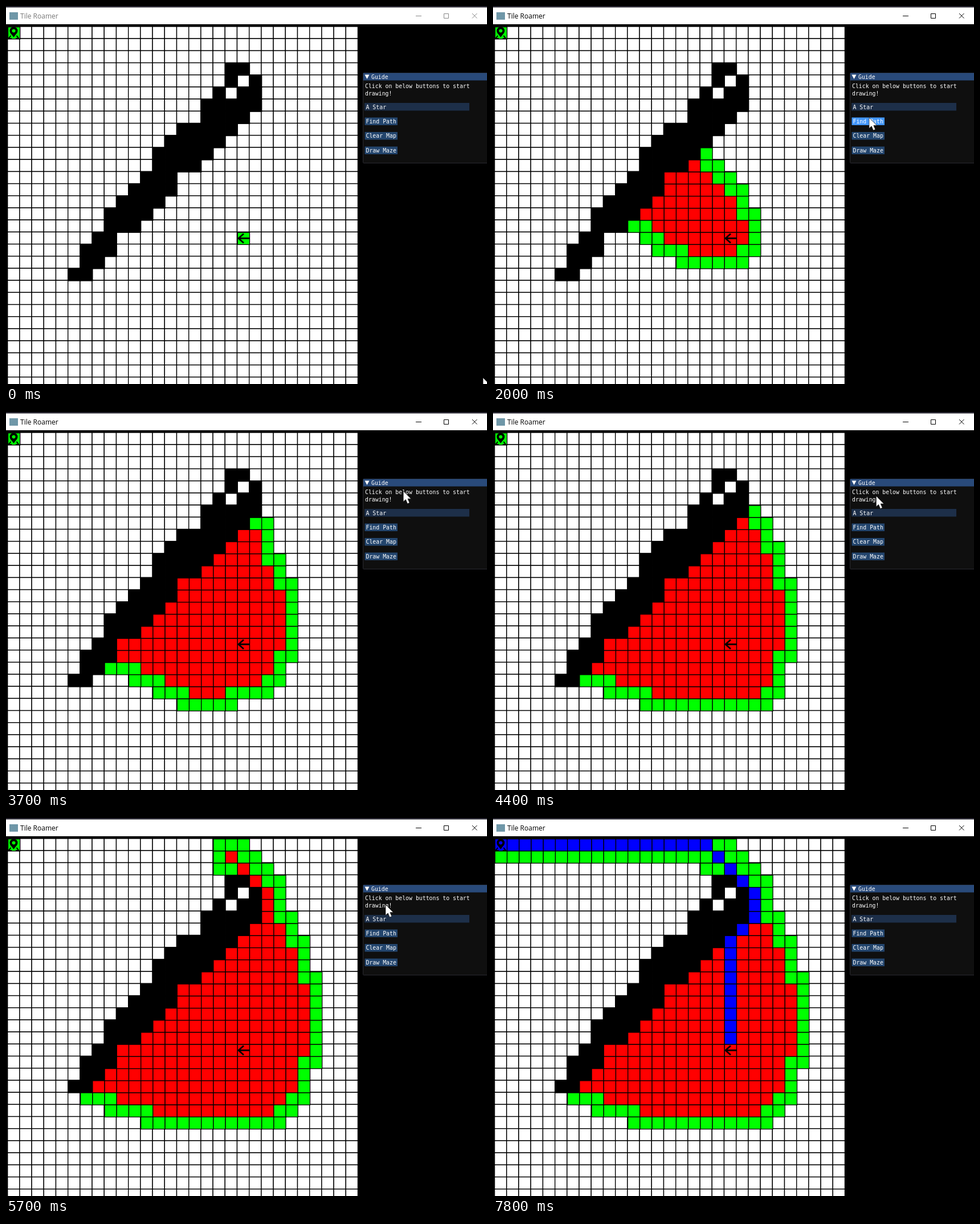
Recreate the animation shown at these times as an HTML page. Size 844 by 663 pixels, loop 7.9 s.

```html
<!DOCTYPE html>
<html lang="en">
<head>
<meta charset="utf-8">
<title>Tile Roamer</title>
<style>
  html, body { margin: 0; width: 100%; height: 100%; overflow: hidden; background: #000; }
  svg { display: block; }
  .mono { font: 9.86px "DejaVu Sans Mono", monospace; fill: #fff; }
  .caption { font: 12px "Open Sans", "Noto Sans", sans-serif; }
</style>
</head>
<body>
<svg id="stage" width="844" height="663" viewBox="0 0 844 663">
  <rect width="844" height="663"/>
  <g id="board" fill="#fff" stroke="#000" stroke-width="1.4"></g>
  <g id="cells" stroke="#000" stroke-width="1.3"></g>

  <g id="icons">
    <path fill-rule="evenodd" d="M13.5 55 C11 50.5 6.5 48 6.5 43.5 A7 7 0 0 1 20.500 43.5 C20.500 48 16 50.500 13.5 55Z
      M13.5 40.400 a3.100 3.100 0 1 0 .01 0Z"/>
    <path d="M8.500 52 L4.500 57 H10 M18.500 52 L22.500 57 H17" fill="none" stroke="#000" stroke-width="2"/>
    <path d="M427 407.500 H408 M417 399.500 L408 407.500 L417 415.500" fill="none" stroke="#000" stroke-width="2.800"/>
  </g>

  <rect width="844" height="3" fill="#24222c"/>
  <rect y="2.500" width="844" height="29.500" fill="#fff"/>
  <rect x="6" y="11" width="15" height="13" fill="#6f97a8"/>
  <g id="titlebar">
    <text class="caption" x="25" y="22">Tile Roamer</text>
    <path id="windowButtons" d="M719 17.500 H729 M768.500 13.500 h8 v8 h-8Z M818 13 l8.500 8.500 M826.500 13 l-8.500 8.500" fill="none"/>
  </g>

  <rect x="626.500" y="117.500" width="220" height="158" rx="1" fill="#0f0f0f" stroke="#2b2b32"/>
  <rect x="627" y="117.500" width="217" height="13" fill="#294a7a"/>
  <path d="M629.500 120.500 h8 l-4 7.500Z" fill="#fff"/>
  <rect x="629" y="170" width="184" height="13.500" fill="#1d2f49"/>
  <g id="buttons"></g>
  <g class="mono">
    <text x="641" y="128">Guide</text>
    <text x="630" y="143.500">Click on below buttons to start</text>
    <text x="630" y="156.500">drawing!</text>
    <text x="631.500" y="180.500">A Star</text>
  </g>
  <path id="cursor" d="M0 0 V18.500 L4.200 14.800 L7.300 22 L10.800 20.500 L7.800 13.500 H13.500Z" fill="#fff" stroke="#111" stroke-width=".6"/>
</svg>

<script>
const LOOP = 7900, STEP = 100;
const COLS = 29, ROWS = 30, PITCH = 21.2, LEFT = 2.7, TOP = 36;
const TILE_SHIFT = 0.8;  // coloured tiles sit slightly right of and below the grid
const START = [19, 17], GOAL = [0, 0];
const STRAIGHT = 10, DIAGONAL = 14;
const COLOR = { empty: 'none', wall: '#000', open: '#00ff00', closed: '#ff0000', path: '#0000ff' };

// First and last wall column of each row, from row 3 down.
const WALL_TOP = 3;
const WALL_SPANS = [
  [18, 19], [18, 20], [17, 20], [16, 20], [16, 19], [14, 18], [13, 17], [12, 16], [12, 15],
  [11, 13], [10, 13], [9, 12], [8, 11], [8, 10], [7, 8], [6, 8], [6, 7], [5, 6]
];
const WALL_GAPS = ['19,4', '18,5'];

// [ms, cells expanded]
const SEARCH_KEYS = [[1030, 0], [1500, 21], [2000, 44], [3000, 86], [4400, 142], [5700, 183], [6250, 201]];
const TRACE_START = 6250, TRACE_END = 7350, FOCUS_AT = 900;
// [ms, x, y]
const CURSOR_KEYS = [
  [0, 837, 652], [200, 837, 652], [800, 660, 196], [2200, 660, 196], [2900, 731, 127], [3200, 731, 127],
  [4100, 673, 147], [5700, 666, 152], [6000, 666, 152], [6400, 680, 670]
];

const byId = id => document.getElementById(id);

function add(parent, tag, attrs, text) {
  const node = document.createElementNS('http://www.w3.org/2000/svg', tag);
  for (const key in attrs) node.setAttribute(key, attrs[key]);
  if (text) node.textContent = text;
  return parent.appendChild(node);
}

function sample(keys, t, ease = u => u) {
  if (t <= keys[0][0]) return keys[0].slice(1);
  const next = keys.findIndex(key => key[0] > t);
  if (next < 0) return keys[keys.length - 1].slice(1);
  const a = keys[next - 1], b = keys[next];
  const u = ease((t - a[0]) / (b[0] - a[0]));
  return a.slice(1).map((v, i) => v + (b[i + 1] - v) * u);
}

function isWall(col, row) {
  const span = WALL_SPANS[row - WALL_TOP];
  return !!span && col >= span[0] && col <= span[1] && !WALL_GAPS.includes(col + ',' + row);
}

const addTile = (layer, col, row, shift) => add(byId(layer), 'rect', {
  x: LEFT + col * PITCH + shift, y: TOP + row * PITCH + shift, width: PITCH, height: PITCH
});

const grid = [];
for (let row = 0; row < ROWS; row++) {
  for (let col = 0; col < COLS; col++) {
    const big = Math.max(col, row), small = Math.min(col, row);
    addTile('board', col, row, 0);
    grid.push({
      col, row, wall: isWall(col, row),
      g: Infinity, h: STRAIGHT * (big - small) + DIAGONAL * small,
      openedAt: Infinity, closedAt: Infinity, tracedAt: Infinity, parent: null,
      fill: '', node: addTile('cells', col, row, TILE_SHIFT)
    });
  }
}
const cellAt = (col, row) =>
  col >= 0 && col < COLS && row >= 0 && row < ROWS ? grid[row * COLS + col] : null;

function neighbours(cell) {
  const found = [];
  for (let dy = -1; dy <= 1; dy++) {
    for (let dx = -1; dx <= 1; dx++) {
      const other = cellAt(cell.col + dx, cell.row + dy);
      if (!other || other === cell || other.wall) continue;
      // A diagonal may pass one wall corner, but not squeeze between two.
      if (dx && dy && isWall(cell.col + dx, cell.row) && isWall(cell.col, cell.row + dy)) continue;
      found.push([other, dx && dy ? DIAGONAL : STRAIGHT]);
    }
  }
  return found;
}

// A* with the octile distance; ties go to the cell nearest the goal. Returns the path length.
function search() {
  const start = cellAt(...START), goal = cellAt(...GOAL);
  const before = (a, b) => (a.g + a.h - b.g - b.h || a.h - b.h) < 0;
  const open = new Set([start]);
  start.g = 0;
  start.openedAt = goal.openedAt = 0;
  for (let step = 1; open.size; step++) {
    const cell = [...open].reduce((best, c) => before(c, best) ? c : best);
    open.delete(cell);
    cell.closedAt = step;
    if (cell === goal) break;
    for (const [other, cost] of neighbours(cell)) {
      if (other.closedAt < Infinity || cell.g + cost >= other.g) continue;
      other.g = cell.g + cost;
      other.parent = cell;
      other.openedAt = Math.min(other.openedAt, step);
      open.add(other);
    }
  }
  let length = 0;
  for (let cell = goal; cell !== start; cell = cell.parent) cell.tracedAt = ++length;
  return length;
}
const pathLength = search();

const buttons = ['Find Path', 'Clear Map', 'Draw Maze'].map((label, i) => {
  const y = 195.5 + i * 25.5;
  const node = add(byId('buttons'), 'rect', { x: 629.5, y, width: 57.5, height: 13.5 });
  add(byId('buttons'), 'text', { x: 631.5, y: y + 10.3, class: 'mono' }, label);
  return { node, y };
});

function cellColor(cell, expanded, traced) {
  if (cell.wall) return COLOR.wall;
  if (cell.tracedAt <= traced) return COLOR.path;
  if (cell.closedAt <= expanded) return COLOR.closed;
  return cell.openedAt <= expanded ? COLOR.open : COLOR.empty;
}

function draw(t) {
  const expanded = Math.floor(sample(SEARCH_KEYS, t)[0] + 1e-6);
  const traced = Math.floor((t - TRACE_START) / (TRACE_END - TRACE_START) * pathLength);
  for (const cell of grid) {
    const fill = cellColor(cell, expanded, traced);
    if (fill === cell.fill) continue;
    cell.fill = fill;
    cell.node.setAttribute('fill', fill);
    cell.node.setAttribute('visibility', fill === COLOR.empty ? 'hidden' : 'visible');
  }

  const [x, y] = sample(CURSOR_KEYS, t, u => u * u * (3 - 2 * u));
  byId('cursor').setAttribute('transform', `translate(${x} ${y})`);
  for (const b of buttons) {
    const hover = x >= 629 && x <= 687 && y >= b.y && y <= b.y + 13.5;
    b.node.setAttribute('fill', hover ? '#4296fa' : '#23456d');
  }

  const focused = t >= FOCUS_AT;
  byId('titlebar').setAttribute('fill', focused ? '#000' : '#777');
  byId('windowButtons').setAttribute('stroke', focused ? '#000' : '#888');
}

const origin = performance.now();
function tick() {
  const t = (performance.now() - origin) % LOOP;
  draw(Math.floor(t / STEP) * STEP);
  requestAnimationFrame(tick);
}
tick();
</script>
</body>
</html>
```
